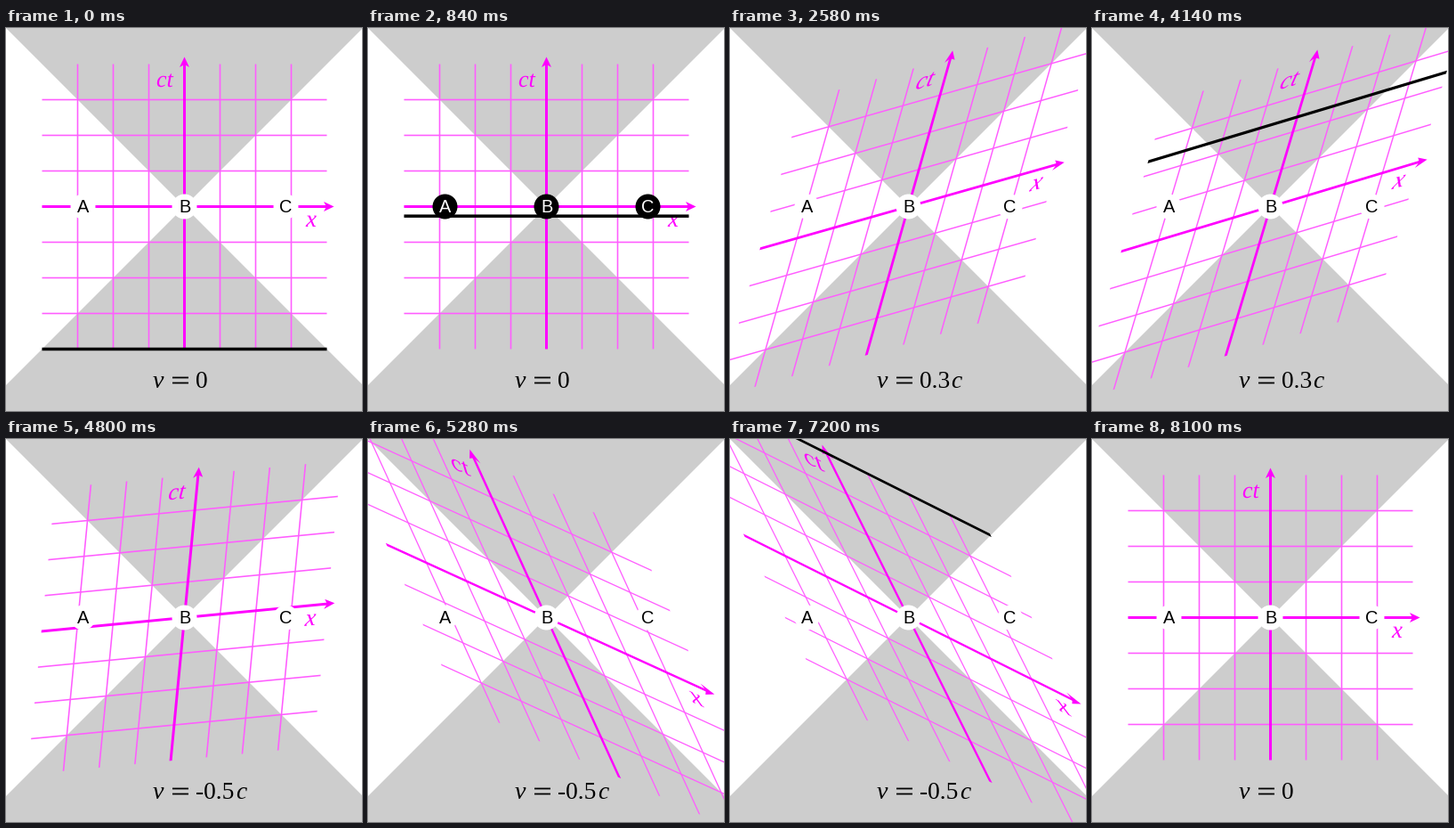
A matplotlib script that plays this animation: 400x430 px, repeating every 8.16 s.

```python
import numpy as np
import matplotlib.pyplot as plt
from matplotlib.animation import FuncAnimation
from matplotlib.patches import Circle, PathPatch, Polygon, Rectangle
from matplotlib.textpath import TextPath
from matplotlib.transforms import Affine2D

W, H, DPI = 400, 430, 100
PX = 72 / DPI                  # points per pixel
CX = CY = 200.5                # origin of spacetime, in pixels from the top left
HALF, STEP = 160, 40
CYCLE, SWEEP, EASE = 45, 30, 15.15
FRAMES = 3 * CYCLE + 1

GREY, MAGENTA, PINK = "#cdcdcd", "#ff00ff", "#ff5cff"
SERIF, SANS = "Liberation Serif", "Liberation Sans"
SPEEDS = [0, 0.3, -0.5, 0]
CAPTIONS = [("0", None), ("0.3", 248.5), ("-0.5", 258), ("0", None)]
EVENTS = {"A": -114, "B": 0, "C": 114}

plt.rcParams["path.snap"] = False
fig = plt.figure(figsize=(W / DPI, H / DPI), dpi=DPI, facecolor="white")
ax = fig.add_axes([0, 0, 1, 1])
ax.set_xlim(-CX, W - CX)
ax.set_ylim(CY - H, CY)
ax.axis("off")

boost = Affine2D()
moving = boost + ax.transData


def add(patch, z):
    patch.set_zorder(z)
    return ax.add_patch(patch)


def bar(x, y, w, h, color, z):
    return add(Rectangle((x, y), w, h, fc=color, ec="none", transform=moving), z)


def grid_pair(offset, width, color, z):
    bar(-HALF, offset - width / 2, 2 * HALF, width, color, z)
    bar(offset - width / 2, -HALF, width, 2 * HALF, color, z)


def symbol(x, y, text, size):
    path = TextPath((x, y), text, size=size,
                    prop={"family": SERIF, "style": "italic"})
    add(PathPatch(path, fc=MAGENTA, ec="none", transform=moving), 4)


def write(x, y, text, size, family=SERIF, **kw):
    return ax.text(x - CX, CY - y, text, fontsize=size * PX, family=family,
                   va="baseline", zorder=8, **kw)


# Light cones
for sign in (1, -1):
    add(Polygon([(0, 0), (-300, 300 * sign), (300, 300 * sign)],
                fc=GREY, ec="none"), 0)

# Coordinate grid and axes
for k in (-3, -2, -1, 1, 2, 3):
    grid_pair(k * STEP, 1.6, PINK, 2)
grid_pair(0, 3, MAGENTA, 3)
head = np.array([(168, 0), (156.5, 5.5), (159.5, 0), (156.5, -5.5)])
for pts in (head, head[:, ::-1]):
    add(Polygon(pts, fc=MAGENTA, ec="none", transform=moving), 3)
symbol(-31.5, 134.5, "ct", 26)
symbol(136.5, -22.5, "x", 27)

# Plane of simultaneity
now = bar(-HALF, 0, 2 * HALF, 3.5, "black", 5)

# Events
marks = []
for name, x in EVENTS.items():
    disc = add(Circle((x, 0), 14, fc="white", ec="none"), 7)
    label = write(x + CX, 207.5, name, 20, SANS, ha="center")
    marks.append((x, disc, label))

# Caption
write(165, 404, "v", 28, style="italic")
for y in (392.5, 398.5):
    add(Rectangle((187 - CX, CY - y - 0.9), 18, 1.8, fc="black", ec="none"), 8)
value = write(212.5, 404, "0", 27.5)
unit = write(250, 404, "c", 27.5, style="italic")


def smooth(s):
    s = min(max(s, 0), 1)
    return s * s * (3 - 2 * s)


def update(i):
    leg = min(i // CYCLE, 2)
    n = i - leg * CYCLE
    sweeping = n <= SWEEP
    v0, v1 = SPEEDS[leg:leg + 2]
    v = v0 + (v1 - v0) * smooth((n - SWEEP) / EASE)
    g = 1 / np.sqrt(1 - v * v)
    boost.set_matrix(np.array([[g, g * v, 0], [g * v, g, 0], [0, 0, 1]]))

    t = -HALF + 2 * HALF * n / SWEEP
    now.set_y(t - 1.75)
    now.set_visible(sweeping)

    for x, disc, label in marks:
        hit = sweeping and abs(t + g * v * x) < 11
        disc.set_facecolor("black" if hit else "white")
        label.set_color("white" if hit else "black")

    text, x = CAPTIONS[leg if sweeping else leg + 1]
    value.set_text(text)
    unit.set_visible(x is not None)
    if x is not None:
        unit.set_x(x - CX)
    return []


anim = FuncAnimation(fig, update, frames=FRAMES, interval=60,
                     init_func=lambda: update(0), repeat=True, repeat_delay=0)
plt.show()
```
